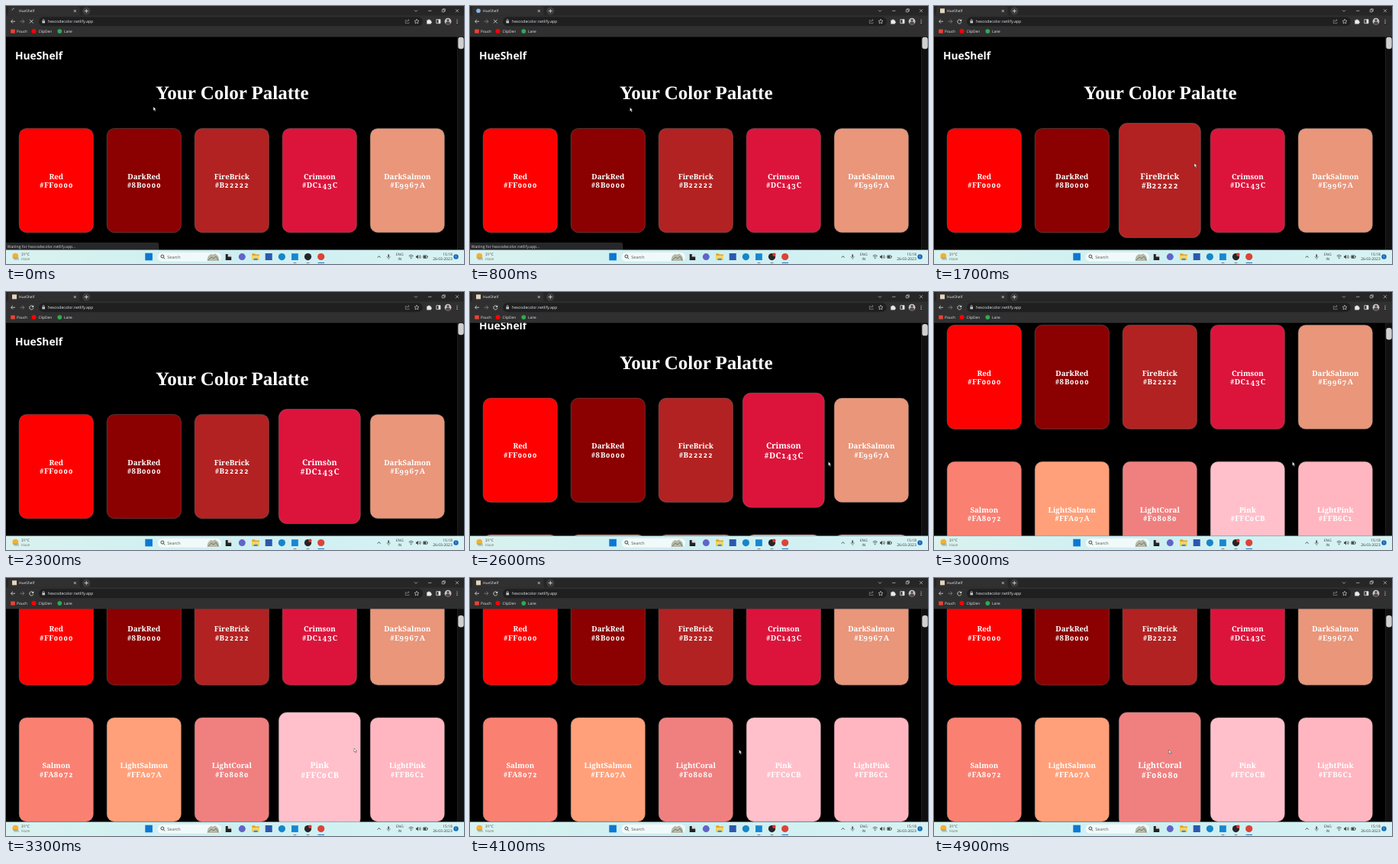
Write an HTML page that moves like this. It is 600 px wide and 338 px high and loops after 5 s.

```html
<!DOCTYPE html>
<html lang="en">
<head>
<meta charset="utf-8">
<title>Color palette</title>
<style>
html, body { margin: 0; width: 100%; height: 100%; overflow: hidden; background: #000; }
svg { display: block; width: 100vw; height: 100vh; }
text { font-family: "Open Sans", sans-serif; font-size: 5.2px; white-space: pre; text-rendering: geometricPrecision; }
.card text { font: bold 9.7px "Noto Serif", serif; fill: #fff; text-anchor: middle; }
.card .code { letter-spacing: .35px; }
.card .low { font: bold 7.5px "DejaVu Sans", sans-serif; letter-spacing: 1.2px; }
.card .tall { letter-spacing: 1.1px; }
.card rect { stroke: #808080; stroke-width: .39; }
.line { fill: none; stroke: #dfe1e5; stroke-width: .8; }
.dark { fill: none; stroke: #222; stroke-width: .8; }
</style>
</head>
<body>
<svg viewBox="0 0 600 338" preserveAspectRatio="none">
  <defs>
    <clipPath id="view"><rect y="40" width="600" height="279.5"/></clipPath>
    <linearGradient id="bar">
      <stop offset="0" stop-color="#d9f2ef"/>
      <stop offset=".5" stop-color="#cdeff2"/>
      <stop offset="1" stop-color="#d8f2f3"/>
    </linearGradient>
  </defs>
  <rect width="600" height="338"/>

  <g clip-path="url(#view)">
    <g id="page">
      <text x="12" y="70" fill="#fff" style="font-weight:700;font-size:13.8px">HueShelf</text>
      <text x="296.3" y="122" fill="#fff" text-anchor="middle" style="font:bold 25px 'Liberation Serif',serif">Your Color Palatte</text>
      <g id="cards"></g>
    </g>
    <rect x="591.5" y="40" width="8.5" height="280" fill="#101010"/>
    <path d="M591.5 40V320" stroke="#333" stroke-width=".5"/>
    <rect id="thumb" x="592.3" y="40.8" width="7.4" height="15.4" rx="3.2" fill="#d0d0d0"/>
    <g id="status">
      <path d="M0 310.3H198q1.8 0 1.8 1.8V320H0Z" fill="#26272a" stroke="#44464a" stroke-width=".4"/>
      <text x="1.8" y="316.8" fill="#cfd1d4" style="font-size:5.1px">Waiting for hexcodecolor.netlify.app...</text>
    </g>
  </g>

  <!-- browser frame -->
  <rect width="600" height="40.5" fill="#303031"/>
  <rect width="600" height="12.5" fill="#262627"/>
  <path d="M1 12.5q2 0 2-2V3q0-2.5 2.5-2.5H94q2.5 0 2.5 2.5v7.5q0 2 2 2Z" fill="#303031"/>
  <path id="spin" d="M8 6A3 3 0 0 1 11 3" fill="none" stroke="#8f959b" stroke-width=".9"/>
  <circle id="globe" cx="11" cy="6.3" r="2.8" fill="#8ab4e8"/>
  <rect id="icon" x="8" y="3.3" width="6" height="6" fill="#e5d3bd"/>
  <text x="17" y="8.2" fill="#e8eaed" style="font-size:4.8px">HueShelf</text>
  <path class="line" d="M88.8 5l3 3m0-3l-3 3"/>
  <circle cx="105.3" cy="6.5" r="5.2" fill="#3c3c3d"/>
  <path class="line" d="M102.8 6.5h5m-2.5-2.5v5"/>
  <path class="line" style="stroke-width:.6" d="M535 5.3l2 2 2-2M553 6.3h4.5M571.2 4.8h3v3h-3ZM572.3 4.8v-1h3v3h-1M589 4.2l4 4m0-4l-4 4"/>
  <path class="line" d="M12 20.2H6.5m2.4-2.4l-2.4 2.4 2.4 2.4"/>
  <path class="line" style="stroke:#85878b" d="M18.5 20.2H24m-2.4-2.4l2.4 2.4-2.4 2.4"/>
  <path id="stop" class="line" d="M31 17.9l4.6 4.6m0-4.6l-4.6 4.6"/>
  <g id="reload">
    <path class="line" d="M35.2 18.6A2.6 2.6 0 1 0 35.9 21"/>
    <path d="M36.2 17.2v2.7h-2.7Z" fill="#dfe1e5"/>
  </g>
  <rect x="43" y="14.2" width="503" height="12" rx="6" fill="#1f1f20"/>
  <rect x="47.4" y="19.4" width="3.6" height="3" fill="#c4c7cb"/>
  <path class="line" style="stroke-width:.6" d="M48.1 19.6v-1a1.1 1.1 0 0 1 2.2 0v1"/>
  <text x="55" y="22" fill="#e8eaed">hexcodecolor.netlify.app</text>
  <path class="line" style="stroke-width:.6;stroke:#9a9c9f" d="M525 18.6h-1.7v4h4.6v-1.4M525 21q.3-2.5 3-2.5m-1.2-1.3l1.4 1.3-1.4 1.3"/>
  <path class="line" style="stroke-width:.6" d="M538 17.2l.9 2 2.1.2-1.6 1.4.5 2.1-1.9-1.1-1.9 1.1.5-2.1-1.6-1.4 2.1-.2Z"/>
  <path d="M551.3 18.6h1.7a1.1 1.1 0 0 1 2.2 0h1.6v1.6a1.1 1.1 0 0 1 0 2.2v1.1h-5.5Z" fill="#e8eaed"/>
  <path class="line" d="M563.8 17.7h5.2v5h-5.2Z"/>
  <rect x="566.5" y="17.7" width="2.5" height="5" fill="#e8eaed"/>
  <circle cx="579" cy="20.2" r="4.4" fill="#c9c3bf"/>
  <path d="M576 23.2q0-3 3-3t3 3q-3 2.2-6 0Z" fill="#51474a"/>
  <circle cx="579" cy="18.5" r="1.6" fill="#51474a"/>
  <g fill="#dfe1e5"><circle cx="591" cy="18" r=".6"/><circle cx="591" cy="20.2" r=".6"/><circle cx="591" cy="22.4" r=".6"/></g>
  <rect x="6.2" y="30.6" width="5.6" height="5" fill="#ea4335"/>
  <circle cx="36.5" cy="33.1" r="3" fill="#f00"/>
  <circle cx="70.3" cy="33.1" r="2.9" fill="#34a853"/>
  <g fill="#e8eaed">
    <text x="14" y="35" style="font-size:4.8px">Pouch</text>
    <text x="42.6" y="35" style="font-size:4.8px">ClipDen</text>
    <text x="76" y="35" style="font-size:4.8px">Lane</text>
  </g>

  <!-- taskbar -->
  <rect y="319.5" width="600" height="18.5" fill="url(#bar)"/>
  <circle cx="12.3" cy="327.6" r="3.9" fill="#f5b02e"/>
  <path d="M9 330.2h7.5m-6 1.8h6.5" stroke="#8b9aa5" stroke-width=".9"/>
  <text x="20" y="327" fill="#333" style="font-size:4.9px">31°C</text>
  <text x="20" y="333.4" fill="#777" style="font-size:4.9px">Haze</text>
  <rect x="182.3" y="323.7" width="9.6" height="9.6" fill="#0a78d4"/>
  <rect x="198" y="322.3" width="84.5" height="12.8" rx="6.4" fill="#f1fafa" stroke="#c5dcdd" stroke-width=".4"/>
  <circle class="dark" cx="204.9" cy="328" r="2"/>
  <path class="dark" d="M206.3 329.5l1.8 1.9"/>
  <text x="211.3" y="330.8" fill="#555" style="font-size:5.5px">Search</text>
  <path d="M263.5 334q0-6 3.5-8 2-2 4 0 3-3 5 0 3.5 2 3 8Z" fill="#b5b9a9"/>
  <path d="M265 333l4-4 3 2 3-3 3 5" fill="none" stroke="#6d7468" stroke-width=".9"/>
  <rect x="290.4" y="325" width="4.8" height="6" fill="#d9dcdf"/>
  <path d="M287.7 325h3v3.5h4.5v4.5h-7.5Z" fill="#222"/>
  <circle cx="309.3" cy="328.6" r="4.5" fill="#6264c7"/>
  <path d="M322.3 324.2h3.5l1 1.2h5.2v7.6h-9.7Z" fill="#e6a520"/>
  <path d="M322.3 327h9.7v6h-9.7Z" fill="#ffd35c"/>
  <rect x="324.5" y="330.7" width="5.2" height="2.3" fill="#3c8ed8"/>
  <rect x="339.7" y="324" width="9" height="9" fill="#2d57ad"/>
  <circle cx="361.4" cy="328.6" r="4.6" fill="#1686c8"/>
  <rect x="374" y="324.2" width="8.8" height="8.8" fill="#1788d1"/>
  <circle cx="395.5" cy="328.6" r="4.6" fill="#252528"/>
  <circle id="rec" cx="398.4" cy="325.7" r="2.2" fill="#e5352b"/>
  <circle cx="412.7" cy="328.5" r="4.6" fill="#db4437"/>
  <path d="M376.6 336.5h3.8M393.6 336.5h3.8" stroke="#75868a"/>
  <path d="M408.6 336.4h8.4" stroke="#176fc0"/>
  <path class="dark" d="M486.7 329.6l2-2 2 2"/>
  <rect x="500.3" y="325.2" width="1.8" height="4" rx=".9" fill="#555"/>
  <path class="dark" style="stroke-width:.5;stroke:#555" d="M498.9 328a2.3 2.3 0 0 0 4.6 0M501.2 330.3v1.9"/>
  <g fill="#333">
    <text x="515.8" y="327" text-anchor="middle" style="font-size:4.7px">ENG</text>
    <text x="515.8" y="333.3" text-anchor="middle" style="font-size:4.7px">IN</text>
    <text x="584.7" y="327" text-anchor="end" style="font-size:4.9px">15:18</text>
    <text x="584.7" y="333.4" text-anchor="end" style="font-size:4.9px">26-03-2023</text>
  </g>
  <path class="dark" style="stroke-width:.7" d="M527.7 327.5q3-2.8 6 0M528.9 329q1.8-1.6 3.6 0"/>
  <circle cx="530.7" cy="330.6" r=".7" fill="#222"/>
  <path d="M537 327.5h1.3l1.8-1.7v5.6l-1.8-1.7H537Z" fill="#444"/>
  <path class="dark" style="stroke-width:.6" d="M541.3 327.2q1.2 1.4 0 2.8M542.4 326.2q2 2.4 0 4.8"/>
  <rect class="dark" style="stroke-width:.6" x="546.6" y="326.7" width="5" height="3.8" rx=".6"/>
  <rect x="547.3" y="327.4" width="2.8" height="2.4" fill="#222"/>
  <path d="M552.3 327.8v1.6" stroke="#222" stroke-width=".7"/>
  <circle cx="589.5" cy="328.5" r="3.2" fill="#1669b5"/>
  <text x="589.5" y="330.1" fill="#fff" text-anchor="middle" style="font-size:4.4px">1</text>

  <path id="cursor" d="M0 0V5l1.2-1 .9 1.9.9-.4-.9-1.9H3.6Z" fill="#fff" stroke="#222" stroke-width=".4"/>
</svg>
<script>
const LOOP = 5000, STEP = 100, FADE = 200;
const CARD = { w: 97.66, h: 136.72, r: 9.77, top: 160.2, pitchX: 115, pitchY: 179 };
const colors = [
  ["Red", "#FF0000"], ["DarkRed", "#8B0000"], ["FireBrick", "#B22222"],
  ["Crimson", "#DC143C"], ["DarkSalmon", "#E9967A"],
  ["Salmon", "#FA8072"], ["LightSalmon", "#FFA07A"], ["LightCoral", "#F08080"],
  ["Pink", "#FFC0CB"], ["LightPink", "#FFB6C1"]
];
// card index, pointer enters, pointer leaves
const hovers = [[2, 1400, 1950], [3, 2100, 2600], [8, 3020, 3900], [7, 4300, 6000]];
// time, x, y
const pointer = [
  [0, 193, 132], [800, 209.5, 133], [1200, 216, 136], [1450, 285, 172], [1700, 341, 206],
  [1900, 347, 209], [2150, 385, 215], [2500, 469.5, 222.5], [3000, 469.5, 222.5],
  [3200, 458, 223], [3300, 456, 223], [3700, 450, 224], [3900, 362, 225],
  [4300, 343, 225], [4800, 309, 225], [4900, 307.5, 225]
];
// time, offset
const scroll = [[2500, 0], [2600, 21.3], [2700, 82], [2800, 117.2], [3050, 117.2], [3200, 150], [3300, 156.5]];

const $ = id => document.getElementById(id);
const clamp = v => Math.max(0, Math.min(1, v));
const ease = v => { v = clamp(v); return v * v * (3 - 2 * v); };

function track(keys, t, col = 1) {
  let i = 0;
  while (i < keys.length - 2 && t >= keys[i + 1][0]) i++;
  const a = keys[i], b = keys[i + 1];
  return a[col] + (b[col] - a[col]) * clamp((t - a[0]) / (b[0] - a[0]));
}

function make(tag, attrs, parent) {
  const el = document.createElementNS("http://www.w3.org/2000/svg", tag);
  for (const k in attrs) el.setAttribute(k, attrs[k]);
  return parent.appendChild(el);
}

// Old-style figures: 0-2 are low, 3 4 5 7 9 hang below the baseline.
function addHex(code, parent) {
  const label = make("text", { class: "code", x: .4, y: 78 }, parent);
  let drop = 0;
  for (const c of code) {
    const next = "34579".includes(c) ? 1.7 : 0;
    const kind = "012".includes(c) ? "low" : /\d/.test(c) ? "tall" : "";
    make("tspan", { dy: next - drop, class: kind }, label).textContent = c;
    drop = next;
  }
}

const cards = colors.map(([name, code], i) => {
  const g = make("g", { class: "card" }, $("cards"));
  make("rect", {
    x: .2 - CARD.w / 2, y: .2, width: CARD.w - .4, height: CARD.h - .4, rx: CARD.r, fill: code
  }, g);
  make("text", { y: 66.6 }, g).textContent = name;
  addHex(code, g);
  return { g, x: 65.8 + i % 5 * CARD.pitchX, y: CARD.top + Math.floor(i / 5) * CARD.pitchY };
});

const show = (id, on) => $(id).setAttribute("visibility", on ? "visible" : "hidden");
const move = (el, x, y, s = 1) => el.setAttribute("transform", `translate(${x} ${y}) scale(${s})`);

function draw(t) {
  const offset = track(scroll, t);
  move($("page"), 0, -offset);
  move($("thumb"), 0, offset * .053);
  cards.forEach(({ g, x, y }, i) => {
    let grow = 0;
    for (const [card, on, off] of hovers)
      if (card === i) grow = ease((t - on) / FADE) - ease((t - off) / FADE);
    move(g, x, y - CARD.h * .05 * grow, 1 + .1 * grow);
  });
  move($("cursor"), track(pointer, t), track(pointer, t, 2));

  const loading = t < 1400;
  show("spin", t < 700);
  show("globe", t >= 700 && loading);
  show("icon", !loading);
  show("stop", loading);
  show("reload", !loading);
  show("status", loading);
  show("rec", t >= 400);
  $("spin").setAttribute("transform", `rotate(${-t * .36} 11 6)`);
}

function frame(now) {
  draw(Math.floor(now % LOOP / STEP) * STEP);
  requestAnimationFrame(frame);
}
draw(0);
requestAnimationFrame(frame);
</script>
</body>
</html>
```
